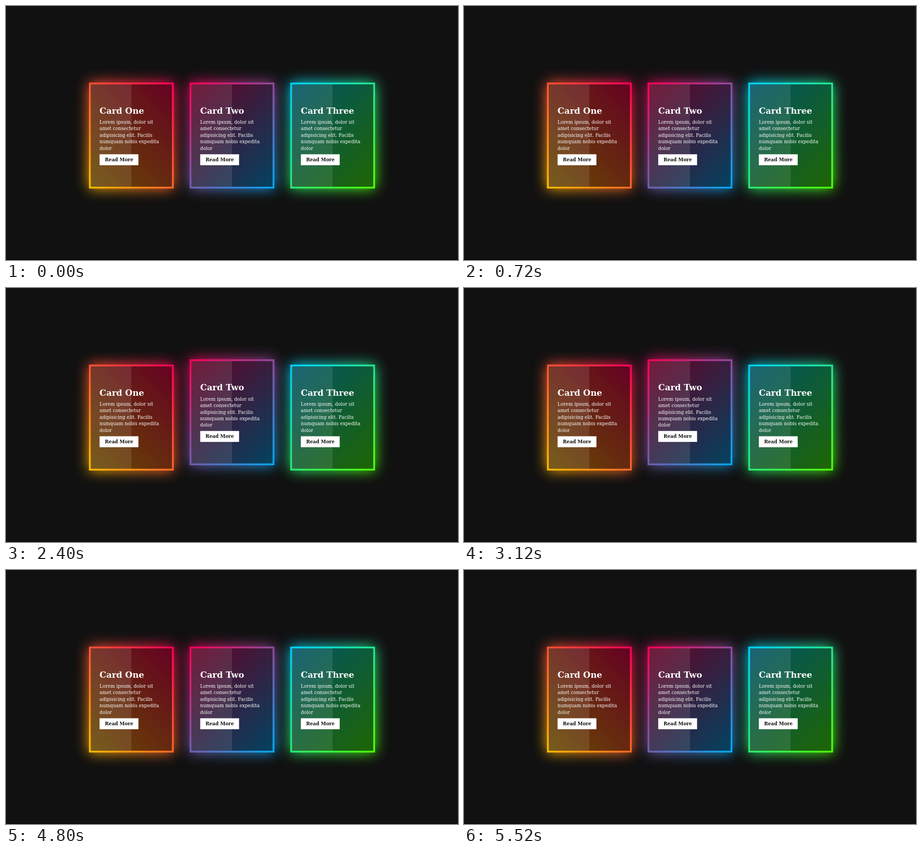
An HTML page for the animation above (6000 ms loop, 998 by 561 pixels).

```html
<!DOCTYPE html>
<html lang="en">
<head>
<meta charset="utf-8">
<title>Glowing cards</title>
<style>
  html, body { margin: 0; width: 100%; height: 100%; overflow: hidden; background: #111; }
  body { position: relative; }
  body::after {
    content: ""; position: absolute; left: 0; right: 0; bottom: 0;
    height: 1px; background: #000;
  }
  #scene {
    position: absolute; width: 1280px; height: 720px;
    transform: scale(calc(998 / 1280)); transform-origin: 0 0;
    font: 13.2px "DejaVu Serif", serif; color: #fff;
  }
  .card { position: absolute; top: 217px; width: 240px; height: 300px; }
  .card.up { top: 202px; }
  .edge, .glow { position: absolute; inset: 0; background: var(--paint); }
  .glow { filter: blur(20px); }
  .shade { position: absolute; inset: 5px; background: rgba(0, 0, 0, .6); }
  .shine {
    position: absolute; left: 5px; top: 5px; bottom: 5px; width: 115px;
    background: rgba(255, 255, 255, .1);
  }
  h2, p, .button { position: absolute; left: 30px; margin: 0; white-space: nowrap; }
  h2 { top: 65.6px; font-size: 24px; line-height: 28px; }
  p { top: 103.6px; line-height: 1.4; }
  .button {
    top: 203px; padding: 8px 15px; line-height: 15.4px;
    background: #fff; color: #111; font-weight: bold;
  }
</style>
</head>
<body>
<div id="scene"></div>
<script>
  const STEP = 1200, STEPS = 5;
  const paints = [
    ["One", "45deg, #ffbc00, #ff0058"],
    ["Two", "315deg, #03a9f4, #ff0058"],
    ["Three", "315deg, #4dff03, #00d0ff"]
  ];

  const scene = document.getElementById("scene");
  scene.innerHTML = paints.map(([name, paint], i) => `
    <div class="card" style="left:${235 + 285 * i}px; --paint:linear-gradient(${paint})">
      <div class="glow"></div>
      <div class="edge"></div>
      <div class="shade"></div>
      <div class="shine"></div>
      <h2>Card ${name}</h2>
      <p>Lorem ipsum, dolor sit<br>amet consectetur<br>adipisicing elit. Facilis<br>numquam nobis expedita<br>dolor</p>
      <div class="button">Read More</div>
    </div>`).join("");
  const cards = [...scene.children];

  // Each card jumps up in turn; the first and last steps are at rest.
  const start = performance.now();
  function draw() {
    const step = Math.floor((performance.now() - start) / STEP) % STEPS;
    cards.forEach((card, i) => card.classList.toggle("up", step === i + 1));
    requestAnimationFrame(draw);
  }
  draw();
</script>
</body>
</html>
```
